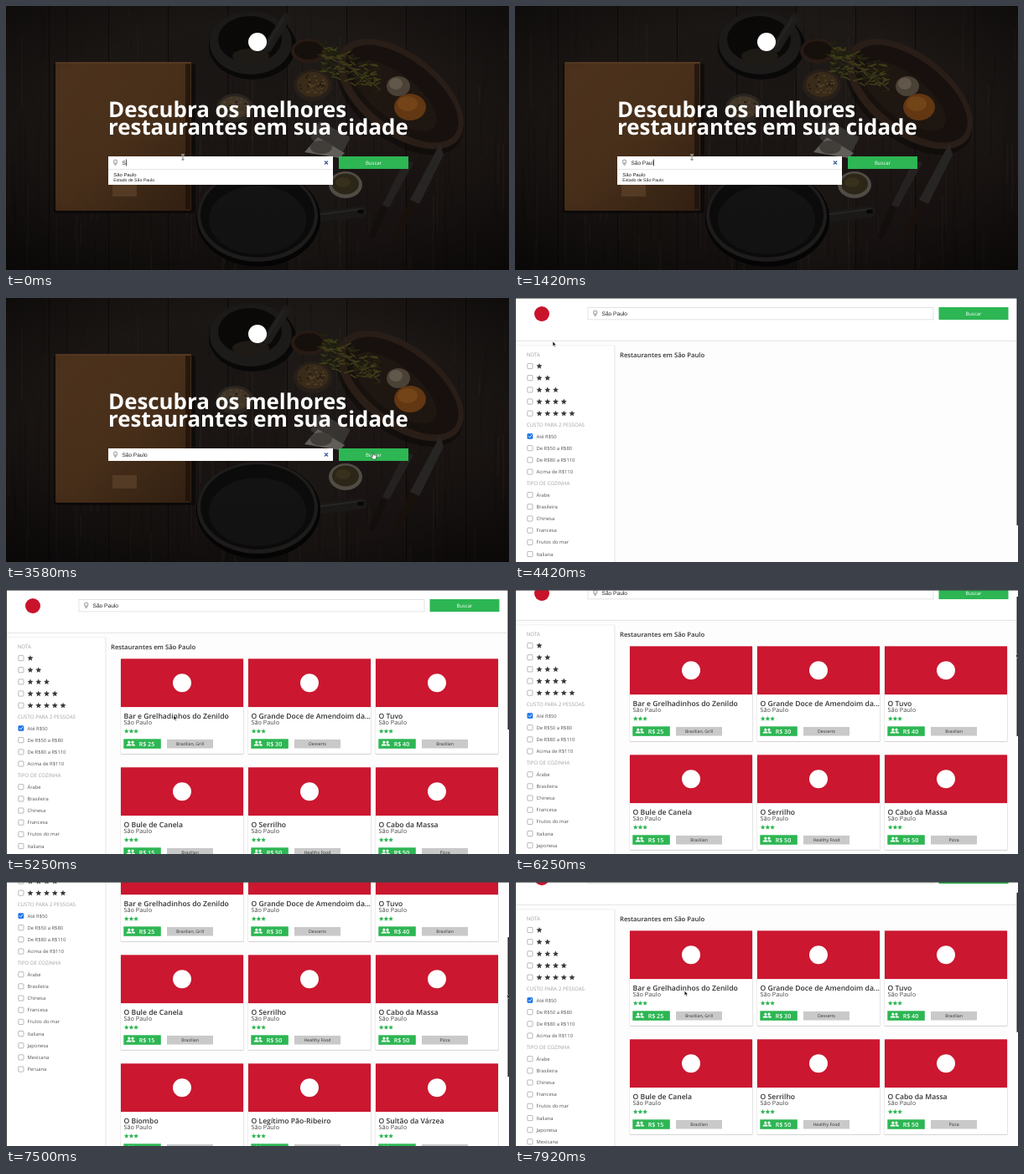
Animation, 600 px wide and 316 px high, one loop 8 s. Source, as an HTML page:

```html
<!DOCTYPE html>
<html lang="pt">
<head>
<meta charset="utf-8">
<title>Busca de restaurantes</title>
<style>
html, body { margin: 0; width: 100%; height: 100%; overflow: hidden; background: #fdfdfd; }
svg { display: block; width: 100vw; height: 100vh; }
text { font-family: "Open Sans", "Noto Sans", sans-serif; text-rendering: geometricPrecision; white-space: pre; }
.arial { font-family: "Liberation Sans", Arial, sans-serif; }
</style>
</head>
<body>
<svg id="stage" viewBox="0 0 600 316" preserveAspectRatio="none"></svg>
<script>
const GREEN = '#2db653', RED = '#cb1730';
const LOOP = 8000, FPS = 12;

const rect = (x, y, w, h, fill, more = '') =>
  `<rect x="${x}" y="${y}" width="${w}" height="${h}" fill="${fill}" ${more}/>`;
const oval = (x, y, rx, ry, fill, more = '') =>
  `<ellipse cx="${x}" cy="${y}" rx="${rx}" ry="${ry}" fill="${fill}" ${more}/>`;
const path = (d, fill, more = '') => `<path d="${d}" fill="${fill}" ${more}/>`;
const stroke = (d, color, w, more = '') =>
  path(d, 'none', `stroke="${color}" stroke-width="${w}" stroke-linecap="round" ${more}`);
const text = (x, y, size, fill, str, more = '') =>
  `<text x="${x}" y="${y}" font-size="${size}" fill="${fill}" ${more}>${str}</text>`;
const group = (body, more = '') => `<g ${more}>${body}</g>`;

function star(cx, cy, r, fill) {
  let d = '';
  for (let i = 0; i < 10; i++) {
    const a = i * Math.PI / 5 - Math.PI / 2, q = i % 2 ? r * 0.45 : r;
    d += (i ? 'L' : 'M') + (cx + q * Math.cos(a)).toFixed(2) + ' ' + (cy + q * Math.sin(a)).toFixed(2);
  }
  return path(d + 'Z', fill);
}

function seeded(seed) {
  return () => (seed = (seed * 16807) % 2147483647) / 2147483647;
}

const pin = (x, y) =>
  path(`M${x} ${y + 4.2}C${x - 4.6} ${y - 1} ${x - 2.6} ${y - 3.8} ${x} ${y - 3.8}S${x + 4.6} ${y - 1} ${x} ${y + 4.2}Z`, '#b4b4b4') +
  oval(x, y - 1, 1.3, 1.3, '#fff');

const button = (x, y, w) =>
  rect(x, y, w, 15, GREEN) + text(x + w / 2, y + 9.7, 6, '#fff', 'Buscar', 'text-anchor="middle"');

// Dark kitchen table seen from above
function table() {
  const rnd = seeded(77);
  let s = rect(0, 0, 600, 316, 'url(#wood)');
  for (let x = -20; x < 600; x += 71) {
    s += rect(x, 0, 71, 316, '#3a2f29', `opacity="${(rnd() * 0.2).toFixed(2)}"`);
    s += rect(x, 0, 1, 316, '#050404', 'opacity=".6"');
  }
  for (let i = 0; i < 160; i++) {
    const x = rnd() * 600, y = rnd() * 300;
    s += rect(x.toFixed(1), y.toFixed(1), (0.6 + rnd() * 2).toFixed(1), (20 + rnd() * 80).toFixed(1), i % 2 ? '#56463c' : '#000', 'opacity=".12"');
  }
  // cardboard box
  s += rect(57, 69, 169, 179, '#050303', 'rx="3" opacity=".5"');
  s += rect(59, 67, 162, 178, 'url(#box)', 'rx="2"');
  s += rect(59, 67, 162, 2, '#6b4a2c', 'opacity=".5"') + rect(214, 69, 6, 174, '#1c110a', 'opacity=".7"');
  s += rect(127, 212, 29, 16, '#6e5035', 'opacity=".55"');
  // mortar
  s += oval(294, 48, 52, 40, '#0a0909') + oval(292, 44, 49, 38, '#1f1d1b') + oval(291, 40, 38, 28, '#0b0a09');
  s += oval(292, 60, 22, 9, '#211c18') + stroke('M312 50L334 14', '#211f1e', 11) + stroke('M310 49L331 15', '#2e2b29', 3, 'opacity=".6"');
  // tray
  const tilt = 'transform="rotate(38 470 106)"';
  s += oval(473, 110, 88, 50, '#080605', tilt + ' opacity=".5"') + oval(470, 105, 88, 48, '#2d2019', tilt) +
    oval(471, 104, 80, 40, '#19120f', tilt) + oval(466, 111, 60, 26, '#211812', tilt);
  // spice bowls
  s += oval(361, 54, 21, 15, '#2b1d16') + oval(361, 53, 17, 11, '#18110d');
  s += oval(273, 122, 22, 17, '#2d2722') + oval(273, 121, 18, 13, '#43382a') +
    oval(366, 95, 23, 19, '#2a211b') + oval(366, 94, 19, 15, '#3d2e1b');
  for (let i = 0; i < 70; i++) {
    const a = rnd() * 6.28, q = Math.sqrt(rnd());
    const [x, y] = i % 2 ? [366, 94] : [273, 121];
    s += oval((x + 16 * q * Math.cos(a)).toFixed(1), (y + 12 * q * Math.sin(a)).toFixed(1), 1.4, 1.1, i % 3 ? '#584429' : '#231a10');
  }
  // herbs
  for (let i = 0; i < 150; i++) {
    const u = rnd(), x = 374 + u * 66, y = 62 + u * 26 + (rnd() - 0.5) * 34;
    s += stroke(`M${x.toFixed(1)} ${y.toFixed(1)}l${(3 + rnd() * 6).toFixed(1)} ${(rnd() * 8 - 4).toFixed(1)}`, i % 2 ? '#45431a' : '#252512', 1.5);
  }
  s += stroke('M372 58Q410 68 446 100', '#3d3a20', 1.2);
  // garlic and orange
  s += oval(468, 96, 14, 12, '#51473c') + oval(465, 93, 8, 7, '#75695a', 'opacity=".7"');
  s += oval(482, 121, 19, 16, '#6b3c14') + oval(479, 117, 12, 9, '#8a5420', 'opacity=".6"');
  // dishes
  s += rect(366, 146, 42, 24, '#3a3734', 'rx="3" transform="rotate(28 387 158)"') +
    path('M356 175L372 157L404 176L398 182Z', '#67635e') + oval(376, 169, 13, 8, '#45413d');
  s += oval(405, 214, 20, 16, '#57524a') + oval(405, 213, 16, 12.5, '#2e2919') + oval(402, 211, 9, 6, '#443c22', 'opacity=".6"');
  // pan
  s += stroke('M368 253L424 246', '#1d1b1a', 13) + stroke('M370 250L424 243', '#2b2826', 2) + oval(423, 246, 4, 2.5, '#080707');
  s += oval(301, 254, 74, 58, '#050505') + oval(300, 251, 72, 55, '#211f1e') + oval(300, 250, 68, 51, '#0d0c0c') +
    oval(300, 256, 58, 41, '#151414');
  // knives
  s += path('M476 184L449 238L457 241L486 188Z', '#272423') + stroke('M450 244L437 274', '#15100e', 8);
  s += path('M518 164L482 232L493 237L522 178Z', '#2b2827') + stroke('M484 238L467 274', '#1b120d', 9);
  return group(s) + rect(0, 0, 600, 316, 'url(#shade)');
}

function hero() {
  return table() + oval(300, 43, 11, 11, '#fff') +
    text(122, 133, 25.88, '#fff', 'Descubra os melhores', 'font-weight="700"') +
    text(122, 154, 25.88, '#fff', 'restaurantes em sua cidade', 'font-weight="700"') +
    rect(122, 180, 268, 15, '#fff') + pin(130.5, 187.3) +
    '<text id="typed" class="arial" x="138.5" y="189.5" font-size="6.5" fill="#222"></text>' +
    rect(0, 183.5, 0.7, 8, '#111', 'id="caret"') +
    stroke('M380.3 185.8l3.4 3.4m0-3.4l-3.4 3.4', '#1d4a8c', 1.2) +
    group(rect(122, 195, 268, 19, '#fff') + rect(122, 195, 268, 0.5, '#ccc') +
      text(128.3, 203.6, 5.9, '#222', 'São Paulo', 'class="arial"') +
      text(128.3, 209.7, 5.2, '#222', 'Estado de São Paulo', 'class="arial"'), 'id="drop"') +
    button(397, 180, 83);
}

const PITCH = 14.17;
const COSTS = ['Até R$50', 'De R$50 a R$80', 'De R$80 a R$110', 'Acima de R$110'];
const KINDS = ['Árabe', 'Brasileira', 'Chinesa', 'Francesa', 'Frutos do mar', 'Italiana', 'Japonesa', 'Mexicana', 'Peruana'];

function checkbox(y, on) {
  return rect(14.8, y - 3.1, 6.2, 6.2, on ? '#1a73e8' : '#fff', `rx="1" stroke="${on ? '#1a73e8' : '#8a8a8a'}" stroke-width=".6"`) +
    (on ? stroke(`M16.2 ${y}l1.4 1.5l2.2-3`, '#fff', 0.9) : '');
}
const heading = (y, str) => text(13.7, y + 2.2, 6.2, '#a2a2a2', str);
const option = (y, str, on) => checkbox(y, on) + text(25.5, y + 2.1, 5.85, '#555', str);

function sidebar() {
  let s = rect(1, 57, 118, 560, '#fff') + rect(118.6, 57, 0.8, 560, '#dedede') + rect(1, 56.6, 118, 0.6, '#e6e6e6');
  s += heading(67.3, 'NOTA');
  for (let i = 0; i < 5; i++) {
    const y = 81.5 + i * PITCH;
    s += checkbox(y, false);
    for (let k = 0; k <= i; k++) s += star(29 + k * 9.75, y + 0.2, 3.7, '#3a3a3a');
  }
  s += heading(151.5, 'CUSTO PARA 2 PESSOAS');
  COSTS.forEach((c, i) => s += option(165.5 + i * PITCH, c, i === 0));
  s += heading(221.5, 'TIPO DE COZINHA');
  KINDS.forEach((k, i) => s += option(235.7 + i * PITCH, k, false));
  return s;
}

const PLACES = [
  ['Bar e Grelhadinhos do Zenildo', 25, 'Brazilian, Grill'],
  ['O Grande Doce de Amendoim da...', 30, 'Desserts'],
  ['O Tuvo', 40, 'Brazilian'],
  ['O Bule de Canela', 15, 'Brazilian'],
  ['O Serrilho', 50, 'Healthy Food'],
  ['O Cabo da Massa', 50, 'Pizza'],
  ['O Biombo', 35, 'Desserts, Ice Cream'],
  ['O Legítimo Pão-Ribeiro', 50, 'Fast Food, Brazilian'],
  ['O Sultão da Várzea', 50, 'Arabian'],
  ['O Sultão da Várzea', 50, 'Arabian']
];

function card([name, price, kind], i) {
  const x = 137 + 152 * (i === 9 ? 1 : i % 3), y = 82.3 + 130 * Math.floor(i / 3);
  const people = oval(8.2, 100.2, 1.5, 1.6, '#fff') + oval(12.4, 100.2, 1.5, 1.6, '#fff') +
    path('M5 104.6q0-2.3 3.1-2.3t3.1 2.3zM11.9 104.6q.1-1.4-.7-2.2q4.1-.5 4.3 2.2z', '#fff');
  let s = rect(-0.4, 0.4, 147, 114.4, '#d6d6d6', 'rx="1"') + rect(0, 0, 146, 113.6, '#fff') +
    rect(0, 0, 146, 57.8, RED) + oval(73, 29, 11, 11, '#fff') +
    text(3.5, 71.3, 8.6, '#333', name, 'font-weight="600"') +
    text(3.5, 78.6, 7.3, '#444', 'São Paulo');
  for (let k = 0; k < 3; k++) s += star(6.7 + k * 5.7, 86.8, 3, GREEN);
  s += rect(3.3, 96, 44.5, 11.5, GREEN) + group(people, 'transform="translate(1.6 -.3)"') +
    text(21.7, 104.4, 7.1, '#fff', 'R$ ' + price, 'font-weight="600"') +
    rect(55, 96.6, 55, 10.6, '#c9c9c9') +
    text(82.5, 104, 5.2, '#333', kind, 'text-anchor="middle"');
  return group(s, `transform="translate(${x} ${y})"`);
}

function results() {
  return rect(0, 0, 600, 316, '#fdfdfd') +
    group(rect(0, 0, 600, 51, '#fff') + rect(0, 50.8, 598, 0.8, '#dcdcdc') +
      oval(32, 19, 9, 9, '#c8132b') +
      rect(87, 11.3, 412, 14.6, '#fff', 'stroke="#cfcfcf" stroke-width=".6"') + pin(95.7, 18.3) +
      text(103.5, 20.7, 6.6, '#222', 'São Paulo', 'class="arial"') + button(505.5, 11, 83) +
      sidebar() +
      text(125, 70.6, 7.7, '#333', 'Restaurantes em São Paulo', 'font-weight="600"') +
      group(PLACES.map(card).join(''), 'id="cards"'), 'id="page"') +
    rect(0, 0, 600, 0.6, '#444') + rect(0, 0, 0.9, 316, '#222') + rect(598.5, 0, 1.5, 272, '#2a2a2a', 'id="thumb"');
}

const edge = 'stroke="#fff" stroke-width=".5"';
const CURSORS = {
  beam: stroke('M-1.2-3h2.4M0-3v6M-1.2 3h2.4', '#fff', 1.3) + stroke('M-1.2-3h2.4M0-3v6M-1.2 3h2.4', '#222', 0.6),
  hand: path('M-.8-2.5q.8-.8 1.4 0v2.2l2.6.6q.9.3.7 1.4l-.6 3.3h-3.6l-2.2-3q.2-1 1.7 0z', '#fff', 'stroke="#222" stroke-width=".6"'),
  arrow: path('M0 0v5.6l1.4-1.2l.9 2l1-.4l-.9-2h1.8z', '#111', edge)
};

const stops = list => list.map(([o, c, a = 1]) => `<stop offset="${o}" stop-color="${c}" stop-opacity="${a}"/>`).join('');
document.getElementById('stage').innerHTML =
  `<defs><linearGradient id="wood" x2="0" y2="1">${stops([[0, '#1c1816'], [0.5, '#1b1614'], [1, '#120f0e']])}</linearGradient>
  <linearGradient id="box" x2="1" y2="1">${stops([[0, '#553820'], [0.5, '#4e331c'], [1, '#352213']])}</linearGradient>
  <radialGradient id="shade" r=".75">${stops([[0, '#000', 0.04], [0.6, '#000', 0.1], [1, '#000', 0.55]])}</radialGradient></defs>` +
  group(hero(), 'id="hero"') + group(results(), 'id="results"') +
  Object.entries(CURSORS).map(([k, v]) => group(v, `id="${k}"`)).join('');

const el = id => document.getElementById(id);
const show = (id, on) => el(id).setAttribute('display', on ? 'inline' : 'none');

const WORD = 'São Paulo';
const OPEN = 3920, LOADED = 4750, PICK = 2830;
const VIEW = 316, SHORT = 367, LONG = 598;

// [time, x, y]
const MOVES = [[0, 211, 181], [1990, 211, 181], [2580, 159.5, 208], [2830, 159.5, 208], [3330, 438, 188],
  [3830, 438, 188], [4330, 45, 52], [4480, 45, 52], [5200, 200, 150], [5500, 200, 150], [6080, 590, 74],
  [6170, 598, 72], [7670, 598, 80], [7750, 560, 92], [7920, 195, 131], [8000, 195, 131]];
// [time, offset]
const SCROLL = [[0, 0], [6080, 0], [6250, 15], [6420, 110], [6670, 257], [6880, 282], [7000, 282],
  [7250, 225], [7500, 125], [7670, 24], [8000, 24]];

function at(track, t) {
  let i = 1;
  while (i < track.length - 1 && track[i][0] <= t) i++;
  const a = track[i - 1], b = track[i];
  const u = Math.min(1, (t - a[0]) / (b[0] - a[0]));
  return a.slice(1).map((v, k) => v + (b[k + 1] - v) * u);
}

function render(t) {
  const found = t >= OPEN, loaded = t >= LOADED;
  show('hero', !found);
  show('results', found);
  show('cards', loaded);
  show('drop', t < PICK);

  const count = Math.min(WORD.length, 1 + Math.floor(t / 180));
  el('typed').textContent = WORD.slice(0, count);
  const end = 138.5 + (found ? 0 : el('typed').getComputedTextLength());
  el('caret').setAttribute('x', end + 0.4);
  show('caret', t < 1750 || (t >= 2000 && t < 2500));

  const [top] = at(SCROLL, t), ratio = VIEW / (loaded ? LONG : SHORT);
  el('page').setAttribute('transform', `translate(0 ${-top})`);
  el('thumb').setAttribute('y', top * ratio);
  el('thumb').setAttribute('height', VIEW * ratio);

  let [x, y] = at(MOVES, t);
  if (t >= 6170 && t < 7670) y = 68 + top * ratio;
  const kind = t < 2330 ? 'beam' : t < OPEN && (t < 2900 || t > 3250) ? 'hand' : 'arrow';
  for (const k in CURSORS) show(k, k === kind);
  el(kind).setAttribute('transform', `translate(${x} ${y})`);
}

const start = performance.now();
function tick() {
  const t = (performance.now() - start) % LOOP;
  render(Math.floor(t * FPS / 1000 + 0.05) * 1000 / FPS);
  requestAnimationFrame(tick);
}
tick();
</script>
</body>
</html>
```
